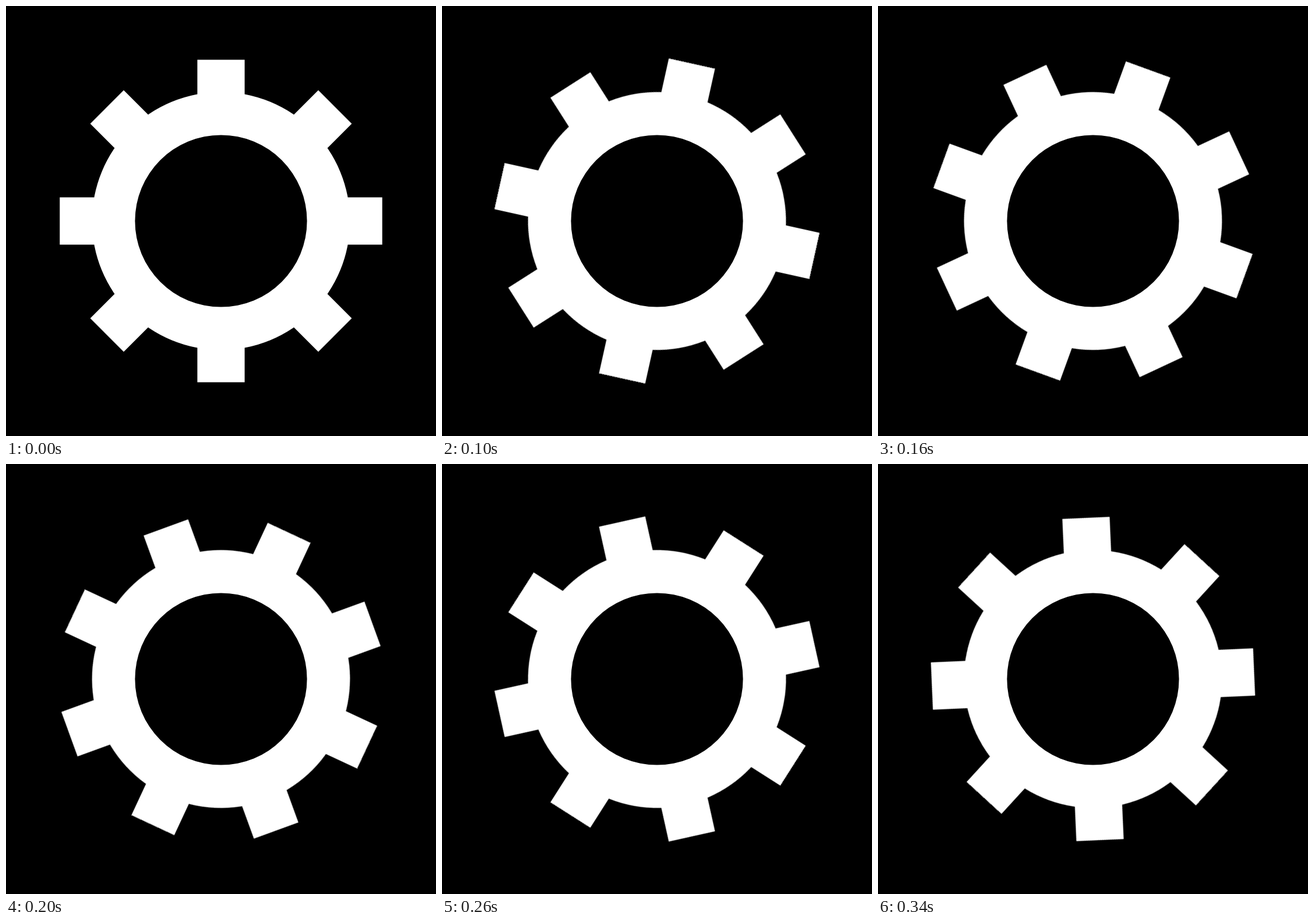
These frames come from a looping animation (748 px wide and 748 px high, 360 ms). An HTML page:

```html
<!DOCTYPE html>
<html lang="en">
<head>
<meta charset="utf-8">
<title>Turning gear</title>
<style>
  html, body {
    margin: 0;
    width: 100%;
    height: 100%;
    overflow: hidden;
    background: #000;
  }
  svg {
    display: block;
    width: 100%;
    height: 100%;
  }
  /* One tooth pitch per loop, 2.5deg every 20ms; the tiny delay keeps step edges exact. */
  .gear {
    animation: turn 360ms steps(18) -0.1ms infinite;
  }
  @keyframes turn {
    from { transform: rotate(0deg); }
    to { transform: rotate(45deg); }
  }
</style>
</head>
<body>
<svg viewBox="-374 -374 748 748">
  <defs>
    <rect id="bar" x="-41.14" y="-280.5" width="82.28" height="561" fill="#fff"/>
  </defs>
  <g class="gear">
    <circle r="224.4" fill="#fff"/>
    <use href="#bar"/>
    <use href="#bar" transform="rotate(45)"/>
    <use href="#bar" transform="rotate(90)"/>
    <use href="#bar" transform="rotate(135)"/>
  </g>
  <circle r="149.6" fill="#000"/>
</svg>
</body>
</html>
```
